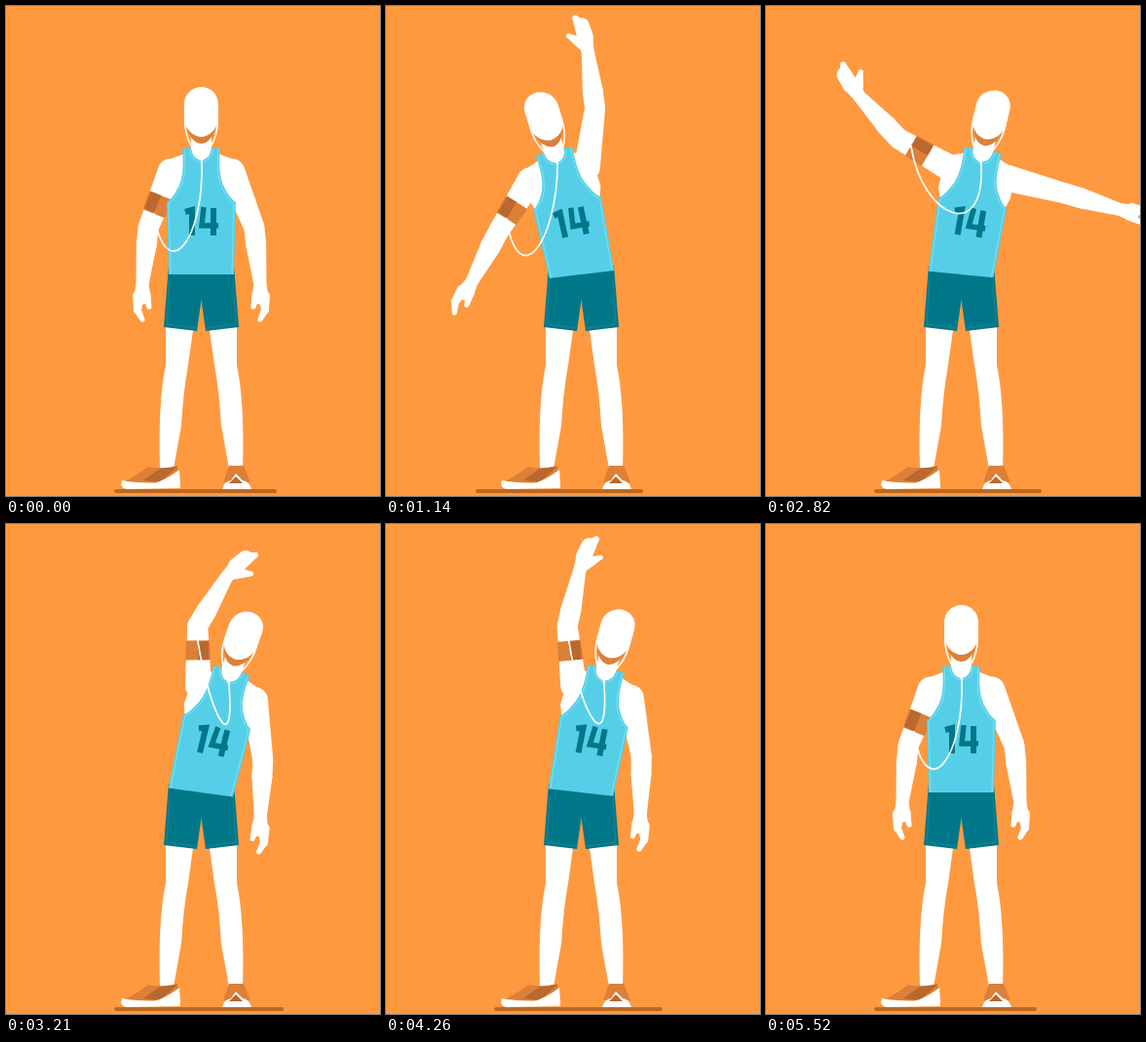
Write an HTML page with a canvas that moves like this. It is 384 px wide and 502 px high and loops after 5.55 s.

```html
<!DOCTYPE html>
<html lang="en">
<head>
<meta charset="utf-8">
<title>Side stretch</title>
<style>
html, body { margin: 0; width: 100%; height: 100%; overflow: hidden; background: #ff993f; }
canvas { display: block; }
</style>
</head>
<body>
<canvas id="stage" width="384" height="502"></canvas>
<script>
const ctx = document.getElementById('stage').getContext('2d');
const LOOP = 5550, RAD = Math.PI / 180;
const ORANGE = '#ff993f', WHITE = '#fff', SHIRT = '#55cfe8', SEAM = '#85dff0', TEAL = '#007788',
  BAND = '#dc8038', BROWN = '#b9682f', GROUND = '#bd681f';

const mix = (a, b, u) => a + (b - a) * u;

// Cubic ease in and out between two times
function step(t, from, to) {
  const u = Math.min(1, Math.max(0, (t - from) / (to - from)));
  return u < .5 ? 4 * u ** 3 : 1 - 4 * (1 - u) ** 3;
}

// Motion: lift the right arm, swap to the left, come back down; sway throughout
const rise = t => step(t, 0, 690);
const swap = t => step(t, 2305, 3265);
const lower = t => step(t, 4890, 5500);
const sway = t => (1 + Math.cos((t - 1110) / 937.5 * 2 * Math.PI)) / 2;

function leanAt(t) {
  const s = sway(t);
  return mix(-9 - 4 * s, 11 + 9 * s, swap(t)) * rise(t) * (1 - lower(t));
}

// Angles of upper arm, forearm and hand; 0 hangs, positive turns outward
const raised = b => [171 + 16 * b, 183 + 53 * b, 189 + 72 * b];
const hanging = (tilt, swing) =>
  [22 - tilt + 23 * swing, 6 - .6 * tilt + 30 * swing, 32 * swing - .2 * tilt];

// Bends upright body coordinates around the hip
function bend(lean) {
  return (x, y) => {
    const h = 272 - y, k = h / 122, dx = x - 200;
    const spine = lean * (.8 + .2 * k) * RAD, roll = lean * (.55 + .5 * Math.min(k, 1)) * RAD;
    return [200 + h * Math.sin(spine) + dx * Math.cos(roll),
            272 - h * Math.cos(spine) + dx * Math.sin(roll)];
  };
}

const still = (x, y) => [x, y];
const mirror = map => (x, y) => map(401 - x, y);

// Points of 2 numbers are corners, 4 are quadratic and 6 are cubic curves
function trace(points, map) {
  ctx.beginPath();
  points.forEach((p, i) => {
    const q = [];
    for (let j = 0; j < p.length; j += 2) q.push(...map(p[j], p[j + 1]));
    if (!i) ctx.moveTo(...q);
    else if (q.length == 2) ctx.lineTo(...q);
    else if (q.length == 4) ctx.quadraticCurveTo(...q);
    else ctx.bezierCurveTo(...q);
  });
}

function fill(color, points, map = still) {
  trace(points, map);
  ctx.fillStyle = color;
  ctx.fill();
}

function line(color, width, points, map = still) {
  trace(points, map);
  ctx.strokeStyle = color;
  ctx.lineWidth = width;
  ctx.stroke();
}

// The same half shape on both sides of the body
function both(paint, map = still) {
  paint(map);
  paint(mirror(map));
}

// Local frame: u runs along the bone, v points outward
function frame([x, y], angle, side) {
  const s = Math.sin(angle * side * RAD), c = Math.cos(angle * side * RAD);
  return (u, v) => [x + s * u + c * v * side, y + c * u - s * v * side];
}

// Tapered limb with round ends
function limb([x0, y0], r0, [x1, y1], r1) {
  const a = Math.atan2(y1 - y0, x1 - x0) + Math.PI / 2;
  ctx.fillStyle = WHITE;
  ctx.beginPath();
  ctx.arc(x0, y0, r0, a, a + Math.PI);
  ctx.arc(x1, y1, r1, a + Math.PI, a);
  ctx.fill();
}

function hand(at, up) {
  limb(at(0, 0), 6.5, at(12, 0), 8.5);
  if (up) {
    limb(at(14, -1), 8.5, at(27, -1), 7.5);
    limb(at(26, 0), 7.5, at(36, 4), 3);
    limb(at(9, 4), 6, at(20, 15), 2.5);
  } else {
    limb(at(12, 4), 6, at(26, 5), 4);
    limb(at(26, 5), 4, at(36, 0), 2.5);
    limb(at(10, -4), 4.5, at(23, -7), 2.5);
  }
}

function arm(body, side, lift, lean, swing, flex) {
  const up = raised(flex);
  const [a1, a2, a3] = hanging(Math.max(0, side * lean), swing * (1 - lift))
    .map((v, i) => mix(v, up[i], lift));
  const upper = frame(body(200.5 + side * (31.5 - 3 * lift), 170 - lift), a1, side);
  const elbow = upper(61, 0), fore = frame(elbow, a2, side), wrist = fore(59, 0);
  limb(upper(0, 0), 13.5, elbow, 10.5);
  limb(elbow, 10.5, fore(18, 0), 10.5);
  limb(fore(18, 0), 10.5, wrist, 6.5);
  hand(frame(wrist, a3, side), lift > .4);
  return upper;
}

function armband(at) {
  fill(BAND, [[26, -13], [46, -12], [46, 12], [26, 13]], at);
  fill(BROWN, [[26, 0], [45, 0], [45, 11], [26, 11]], at);
}

function legs() {
  both(map => fill(WHITE, [[164, 325], [164, 368], [156, 405, 158, 474], [172, 474],
    [180, 430], [182, 395, 187, 368], [193, 325]], map));

  // Left shoe from the side
  fill(BAND, [[119, 488], [130, 484, 146, 472], [160, 475, 176, 471], [179, 488]]);
  fill(BROWN, [[141, 486], [158, 474], [176, 472], [158, 488]]);
  fill(WHITE, [[152, 489], [165, 485, 178, 475], [179, 490]]);
  fill(WHITE, [[119, 486], [140, 490, 179, 488], [179, 494], [124, 495], [116, 494, 119, 486]]);

  // Right shoe from the front
  fill(BAND, [[229, 471], [244, 471], [251, 488], [223, 488]]);
  fill(WHITE, [[222, 495], [224, 487, 231, 486], [236, 479], [243, 486], [250, 487, 252, 495]]);
  fill(BROWN, [[229, 489], [236, 482], [243, 489]]);
}

function shorts() {
  both(map => {
    fill(TEAL, [[201, 266], [167, 266], [162, 329], [196, 333], [201, 298]], map);
    line('#1d8492', 1, [[168, 280], [165, 326], [195, 330]], map);
  });
}

function shirt(body) {
  both(map => {
    fill(SHIRT, [[201, 158], [191, 157, 190, 145], [181, 146], [184, 176, 175, 189],
      [171, 197, 165, 201], [167, 275], [201, 275]], map);
    line(SEAM, 1, [[183, 147], [186, 177, 177, 190], [173, 198, 167, 202], [169, 274]], map);
    line(SEAM, 1, [[188, 146], [190, 159, 200.5, 160]], map);
  }, body);

  // Jersey number
  ctx.lineCap = 'butt';
  line(TEAL, 6, [[184, 211], [191, 209], [191, 235]], body);
  line(TEAL, 5.5, [[203, 206], [201, 225], [218, 225]], body);
  line(TEAL, 6, [[213, 207], [213, 235]], body);
  ctx.lineCap = 'round';
}

function head(body) {
  both(map => fill(BAND, [[201, 120], [185, 120], [186, 130, 192, 141, 201, 141]], map), body);
  both(map => {
    fill(WHITE, [[201, 83], [191, 83, 183, 90, 183, 101], [183, 116], [184, 126, 192, 134, 201, 134]], map);
    line(WHITE, 1.6, [[184, 114], [182, 137, 200.5, 158]], map);
  }, body);
}

function draw(t) {
  // The trunk runs slightly ahead of the arms
  const lean = leanAt(t + 50), body = bend(lean);
  const liftRight = rise(t) * (1 - swap(t)), liftLeft = swap(t) * (1 - lower(t));
  const swing = sway(t) * rise(t) * (1 - lower(t)) * Math.min(1.1, Math.exp((1140 - t) / 1300));

  ctx.fillStyle = ORANGE;
  ctx.fillRect(0, 0, 384, 502);
  ctx.lineCap = 'round';
  const toLeft = Math.min(lean, 0), toRight = Math.max(lean, 0);
  line(GROUND, 4, [[113 + 1.5 * toLeft, 497], [276 + 1.1 * toLeft + .5 * toRight, 497]]);
  legs();
  shorts();

  both(map => fill(WHITE, [[201, 130], [190, 130], [190, 148], [180, 153, 165, 158], [163, 190],
    [167, 202], [201, 202]], map), body);
  const left = arm(body, -1, liftLeft, lean, swing, sway(t));
  arm(body, 1, liftRight, lean, 0, .08 * sway(t));
  armband(left);
  shirt(body);
  head(body);

  // Earphone cord, drooping from the collar to the armband
  const [nx, ny] = body(201, 158), [px, py] = left(46, 0);
  const cx = nx + lean * .3;
  line(WHITE, 1.7, [[nx, ny], [cx + 3, ny + 84, px + 12, py + 76, px, py]]);
}

const start = performance.now();
function tick() {
  draw((performance.now() - start) % LOOP);
  requestAnimationFrame(tick);
}
tick();
</script>
</body>
</html>
```
